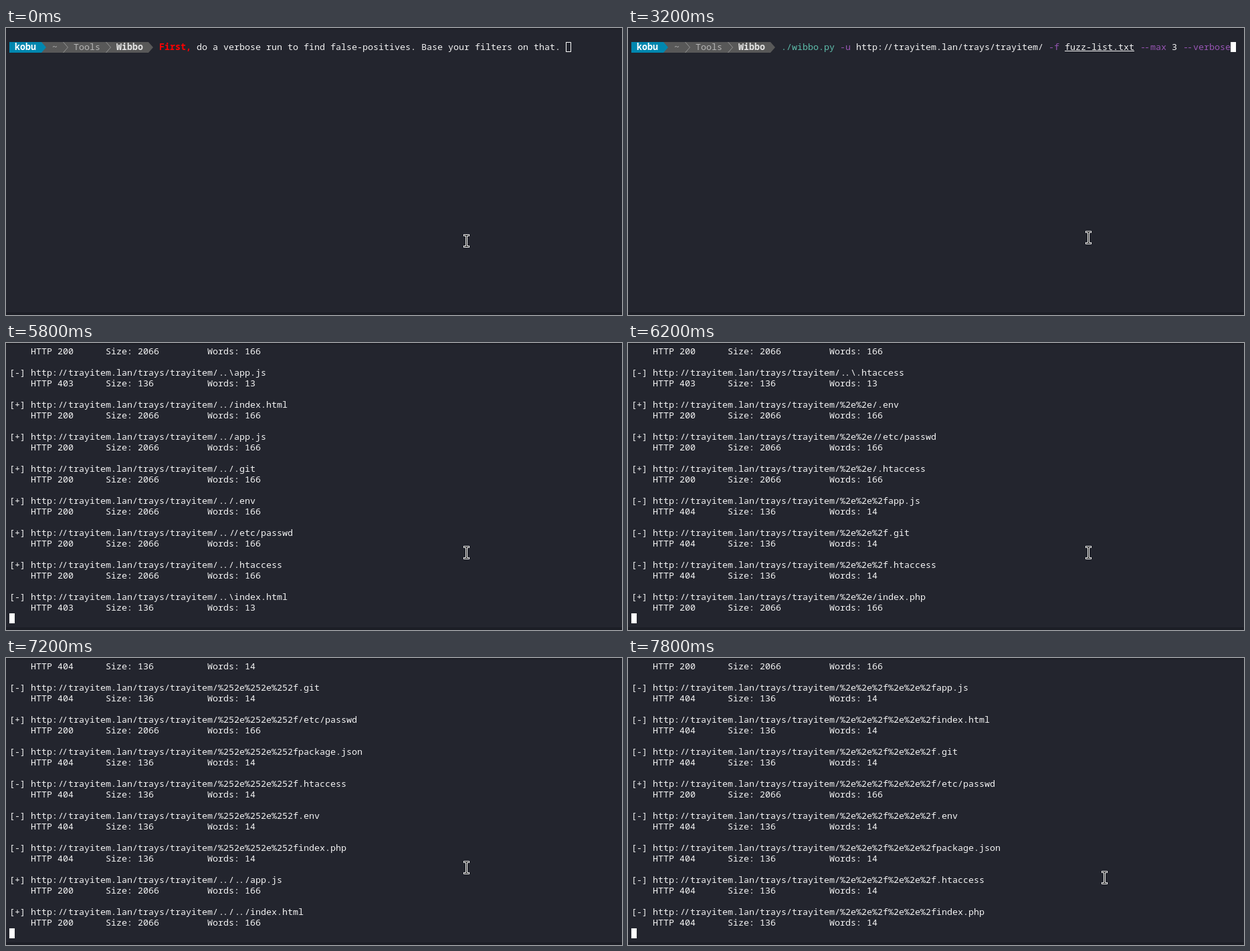
These frames come from a looping animation (921 px wide and 430 px high, 8000 ms). An HTML page:

```html
<!DOCTYPE html>
<html lang="en">
<head>
<meta charset="utf-8">
<title>Terminal run</title>
<style>
  html, body { margin: 0; width: 100%; height: 100%; overflow: hidden; background: #23252e; }
  svg { display: block; position: absolute; left: 0; top: 0; }
  text { font: 13.333px "Noto Sans Mono", "DejaVu Sans Mono", monospace; fill: #f4f4f4; }
  .bold { font-weight: 700; }
  rect { shape-rendering: crispEdges; }
</style>
</head>
<body>
<svg id="stage" width="921" height="430" viewBox="0 0 921 430">
  <defs>
    <linearGradient id="shade" x2="0" y2="1">
      <stop stop-color="#191a21"/><stop offset="1" stop-color="#23252e"/>
    </linearGradient>
  </defs>
  <rect width="921" height="430" fill="#23252e"/>
  <rect width="921" height="3" fill="url(#shade)"/>
  <rect y="426" width="921" height="4" fill="#1c1e26"/>
</svg>
<script>
const LOOP = 8000, CELL = 8, ROW = 16, LEFT = 5, TOP = 5;
const URL_BASE = 'http://trayitem.lan/trays/trayitem/';
const TEAL = '#5ebdab', PURPLE = '#9755b3', WHITE = '#fff';
const stage = document.getElementById('stage');

function add(parent, tag, attrs) {
  const el = document.createElementNS('http://www.w3.org/2000/svg', tag);
  for (const key in attrs) el.setAttribute(key, attrs[key]);
  return parent.appendChild(el);
}

const colX = col => LEFT + col * CELL;
const rowY = row => TOP + row * ROW;
const rect = (parent, x, y, width, height, fill) =>
  add(parent, 'rect', { x, y, width, height, fill });

// Text on the cell grid; paired slashes, dots and dashes move together like ligatures.
function put(parent, col, row, str, fill, bold) {
  const xs = [...str].map((ch, i) => colX(col + i));
  for (const m of str.matchAll(/\/\/|\.\.|--/g)) {
    xs[m.index] += 1;
    xs[m.index + 1] -= 1;
  }
  const el = add(parent, 'text', { x: xs.join(' '), y: rowY(row) + 12 });
  if (fill) el.style.fill = fill;
  if (bold) el.setAttribute('class', 'bold');
  el.textContent = str;
}

const block = (parent, col, row) => rect(parent, colX(col), rowY(row), 8, 15, WHITE);

function arrow(parent, col, fill) {
  const x = colX(col), y = rowY(1);
  add(parent, 'path', { d: `M${x} ${y}l7 8l-7 8z`, fill });
}

function chevron(parent, col) {
  const x = colX(col) + .5, y = rowY(1);
  add(parent, 'path', { d: `M${x} ${y}l7 8l-7 8`, fill: 'none', stroke: '#949494' });
}

function prompt(parent) {
  rect(parent, colX(6), rowY(1), 20 * CELL, ROW, '#585858');
  rect(parent, LEFT, rowY(1), 6 * CELL, ROW, '#0087af');
  arrow(parent, 6, '#0087af');
  arrow(parent, 26, '#585858');
  chevron(parent, 10);
  chevron(parent, 18);
  put(parent, 1, 1, 'kobu', WHITE, true);
  put(parent, 8, 1, '~', '#b4b4b4');
  put(parent, 12, 1, 'Tools', '#b4b4b4');
  put(parent, 20, 1, 'Wibbo', '#e4e4e4', true);
}

function note(focused) {
  return g => {
    prompt(g);
    put(g, 28, 1, 'First,', '#f00', true);
    put(g, 35, 1, 'do a verbose run to find false-positives. Base your filters on that.');
    block(g, 104, 1);
    if (!focused) rect(g, colX(104) + 1, rowY(1) + 1, 6, 13, '#23252e');
  };
}

function command(cursorCol, cursorRow) {
  return g => {
    prompt(g);
    put(g, 28, 1, './wibbo.py', TEAL);
    put(g, 39, 1, '-u', PURPLE);
    put(g, 42, 1, URL_BASE);
    put(g, 78, 1, '-f', PURPLE);
    put(g, 81, 1, 'fuzz-list.txt');
    rect(g, colX(81), rowY(1) + 13, 13 * CELL, 1, '#f4f4f4');
    put(g, 95, 1, '--max', PURPLE);
    put(g, 101, 1, '3');
    put(g, 103, 1, '--verbose', PURPLE);
    block(g, cursorCol, cursorRow);
  };
}

const WORDS = {
  h: 'index.html', a: 'app.js', g: '.git', e: '.env',
  p: '/etc/passwd', t: '.htaccess', j: 'package.json', i: 'index.php'
};
// status, size, words
const REPLIES = { 200: [2066, 166], 403: [136, 13], 404: [136, 14] };

function statusOf(prefix, key) {
  if (key === 'p' || prefix + key === '..%2fa') return 200;
  if (/%2f|%252/.test(prefix)) return 404;
  return /\\|%5c/.test(prefix) ? 403 : 200;
}

function reply(g, row, status, [size, words] = REPLIES[status]) {
  put(g, 4, row, 'HTTP ' + status);
  put(g, 18, row, 'Size: ' + size);
  put(g, 37, row, 'Words: ' + words);
}

// Each group is "prefix:keys"; every key is one entry of three rows.
function results(topStatus, groups) {
  return g => {
    reply(g, 0, topStatus);
    let row = 2;
    for (const group of groups.split(' ')) {
      const [prefix, keys] = group.split(':');
      for (const key of keys) {
        const status = statusOf(prefix, key);
        put(g, 0, row, status === 200 ? '[+]' : '[-]');
        put(g, 4, row, URL_BASE + prefix + WORDS[key]);
        reply(g, row + 1, status, prefix + key === '..%2fa' ? [2168, 198] : undefined);
        row += 3;
      }
    }
    block(g, 0, 25);
  };
}

const SCENES = [
  [0, note(false)],
  [600, note(true)],
  [3200, command(112, 1)],
  [5200, command(0, 2)],
  [5800, results(200, '..\\:a ../:hagept ..\\:h')],
  [6000, results(200, '../:i ..\\:gpj %2e%2e/:ha ..\\:ie')],
  [6200, results(200, '..\\:t %2e%2e/:ept %2e%2e%2f:agt %2e%2e/:i')],
  [6400, results(200, '%2e%2e/:j %2e%2e%2f:epji %2e%2e%5c:ha %2e%2e%2f:h')],
  [6600, results(403, '%2e%2e%5c:gptje ..%2f:ha %2e%2e%5c:i')],
  [6800, results(404, '..%2f:epjt ..%5c:hag ..%2f:i')],
  [7000, results(404, '..%5c:epjt %252e%252e/:agt ..%5c:i')],
  [7200, results(404, '%252e%252e%252f:gpjtei ../../:ah')],
  [7400, results(200, '../../:gepjti ..\\..\\:ap')],
  [7600, results(200, '..\\..\\:hgejti %2e%2e/%2e%2e/:ai')],
  [7800, results(200, '%2e%2e%2f%2e%2e%2f:ahgpejti')]
].map(([at, draw]) => {
  const g = add(stage, 'g', { display: 'none' });
  draw(g);
  return { at, g };
});

const POINTER = [
  { at: 0, x: 688, y: 309 },
  { at: 200, x: 688, y: 304 },
  { at: 7400, x: 712, y: 319 }
];
const pointer = add(stage, 'g', {});
rect(pointer, -4, 0, 9, 3, WHITE);
rect(pointer, -4, 17, 9, 3, WHITE);
rect(pointer, -1, 0, 3, 20, WHITE);
rect(pointer, -3, 1, 7, 1, '#000');
rect(pointer, -3, 18, 7, 1, '#000');
rect(pointer, 0, 1, 1, 18, '#000');

const current = (steps, t) => steps.findLast(step => step.at <= t);
const start = performance.now();
let shown;

function render() {
  const t = Math.max(0, performance.now() - start) % LOOP;
  const scene = current(SCENES, t);
  if (scene !== shown) {
    if (shown) shown.g.setAttribute('display', 'none');
    scene.g.removeAttribute('display');
    shown = scene;
  }
  const { x, y } = current(POINTER, t);
  pointer.setAttribute('transform', `translate(${x} ${y})`);
  requestAnimationFrame(render);
}
render();
</script>
</body>
</html>
```
